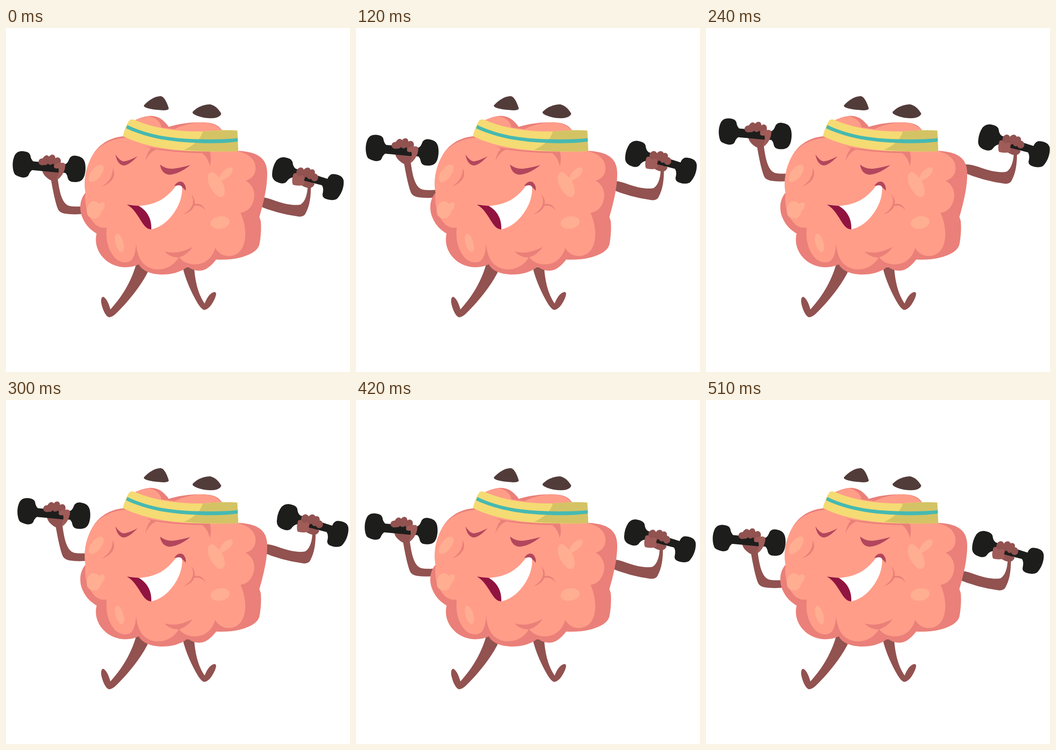
These frames come from a looping animation (748 px wide and 748 px high, 0.54 s). An HTML page:

```html
<!DOCTYPE html>
<html lang="en">
<head>
<meta charset="utf-8">
<title>Brain workout</title>
<style>
  html, body { margin: 0; width: 100%; height: 100%; overflow: hidden; background: #fff; }
  svg { display: block; width: 100vw; height: 100vh; }
  .limb { fill: #915250; }
  .finger { fill: #915250; }
  .palm { fill: #a05c58; }
  .iron { fill: #1d1e1c; }
  .shade { fill: #ea8079; }
  .skin { fill: #ff9d89; }
  .shine { fill: #ffae91; }
  .line { fill: #b3465c; }
  .brow { fill: #523c3a; }
</style>
</head>
<body>
<svg viewBox="0 0 748 748">
  <g id="arms">
    <!-- left arm -->
    <path class="limb" d="M97 325C102 354 107 379 113 394Q116 401 127 403.500Q150 407 180 403V386Q152 390 138 387C121 382 116 355 112 324Z"/>
    <path class="limb" d="M78 306C79 317 86 325 97 331Q106 335 114 328Q122 322 127 308Z"/>
    <path class="iron" d="M38 268C26 267 20 272 17 282C13 293 14 309 19 318Q23 322 35 325Q46 326 49 320Q52 312 57 309L110 314L129 315Q133 319 134 325C136 335 144 335 153 335C165 334 170 327 172 315Q174 305 172 294C169 281 160 279 150 277.500Q140 277 137 286Q134 294 129 296L59 290Q54 285 53 277Q51 269 38 268Z"/>
    <g class="finger">
      <ellipse cx="79" cy="291" rx="8.500" ry="7.500"/>
      <ellipse cx="87" cy="287.500" rx="8" ry="11" transform="rotate(22 87 287)"/>
      <ellipse cx="99" cy="286.500" rx="8" ry="11.500" transform="rotate(22 99 286)"/>
      <ellipse cx="111" cy="291" rx="8" ry="10" transform="rotate(22 111 291)"/>
    </g>
    <path class="palm" d="M104 301Q106 293 121 293Q129 292 129 299Q128 315 116 326Q108 332 111 325Q116 317 114 305Q105 307 104 301Z"/>
    <!-- right arm -->
    <path class="limb" d="M656 344C655 367 648 380 640 384Q618 388 578 373Q562 367 545 368V385Q590 404 636 410Q647 411 651 404C661 386 663 365 663 344Z"/>
    <path class="limb" d="M640 340Q650 348 661 348Q669 346 671 339L650 325Z"/>
    <path class="iron" d="M605 281Q620 283 623 291Q624 302 630 306L699 328Q703 318 711 317.500C724 318 732 323 734 331C736 345 729 363 719 372Q708 377 694 371Q686 367 689 358Q691 348 687 342L622 325Q615 327 611 333Q606 340 595 337C582 333 577 326 579 314C580 302 585 292 589 287Q596 280 605 281Z"/>
    <path class="palm" d="M625 317Q630 313 645 319Q652 323 649 328L648 332Q652 338 645 342Q634 344 624 341Q620 333 625 317Z"/>
    <g class="finger">
      <ellipse cx="640" cy="312.500" rx="8" ry="9.500" transform="rotate(30 640 312)"/>
      <ellipse cx="654" cy="314" rx="8.500" ry="11" transform="rotate(28 654 314)"/>
      <ellipse cx="663" cy="318" rx="8" ry="11.500" transform="rotate(28 663 318)"/>
      <ellipse cx="671" cy="325" rx="8" ry="8.500"/>
    </g>
  </g>

  <!-- legs -->
  <path class="limb" d="M284 510C276 540 260 576 227 612Q221 590 212 584.500Q206 584 207 597C210 613 217 627 224 629Q230 629 238 622C267 594 296 558 311 525Z"/>
  <path class="limb" d="M384 520C391 549 404 577 417 599Q425 612 431 613C441 612 449 600 455 586Q459 575 454 574C444 575 437 586 432 599C417 578 411 548 409 520Z"/>

  <!-- brain -->
  <path class="shade" d="M258 235C230 237 208 249 193 269C177 292 167 327 173 358C161 371 158 393 166 412C173 429 184 439 197 447C192 468 199 489 216 504C235 521 264 525 289 514C295 527 314 536 340 536C359 536 378 532 395 519C408 529 424 530 435 524Q447 517 457 503.500C487 505 518 500 537 488Q548 481 551 471Q556 445 554 420L551 411C560 380 568 347 568 318C569 280 543 269 503 267L470 223C461 208 444 205 425 205C399 205 376 208 354 215C343 199 329 190 313 191Q292 193 277 203Z"/>
  <path class="skin" d="M263 238C230 241 208 252 193 270C176 293 167 327 173 358C170 384 176 409 194 427Q205 436 219 434C216 462 223 486 239 502Q253 513 268 508Q281 502 283 469C285 497 295 515 314 522C340 531 365 518 376 498C388 514 411 518 430 510Q449 500 455 478C465 497 487 500 502 491C526 476 524 432 510 402C529 399 539 383 540 364Q539 342 521 332C543 326 546 306 540 292Q531 272 498 267L468 222C456 208 441 205 421 205Q390 208 366 220L338 216Q335 199 313 192Q293 193 277 204Z"/>
  <g class="shade">
    <path d="M304 258Q370 270 443 268Q448 284 443 301Q441 284 427 272Q370 271 326 264Q310 272 303 290Q306 272 315 262Z"/>
    <path d="M232 305C241 321 230 338 208 345C223 336 233 323 232 305Z"/>
    <path d="M402 360Q413 373 410 383Q426 379 434 397Q423 383 409 387Q404 400 386 405Q402 396 406 383Q409 372 402 360Z"/>
    <path d="M345 486Q373 494 406 476Q395 493 376 499Q357 499 345 486Z"/>
  </g>
  <g class="shine">
    <ellipse cx="196" cy="316" rx="11" ry="22.500" transform="rotate(38 196 316)"/>
    <path d="M178 386Q184 375 194 377Q200 379 202 383Q210 376 214 381Q217 390 207 399Q206 409 196 414Q184 415 178 408Q173 397 178 386Z"/>
    <ellipse cx="246.500" cy="467.500" rx="8.500" ry="20.500" transform="rotate(-16 246 467)"/>
    <path d="M441 317Q447 309 456 318L464 326Q468 311 483 304Q493 301 493 308Q493 321 469 332Q478 350 475 361Q471 371 461 366C448 357 433 333 441 317Z"/>
    <ellipse cx="465.500" cy="423" rx="21" ry="13.500" transform="rotate(-9 465 423)"/>
  </g>

  <!-- headband -->
  <path fill="#f5db73" d="M268 201Q272 197 280 200C324 219 377 226 428 225Q470 221 503 223L505 268C418 270 325 270 254 235Q260 213 268 201Z"/>
  <path fill="#d4c365" d="M428 225Q470 221 503 223L505 268Q440 270 387 265Q421 250 428 225Z"/>
  <path fill="#46b9b2" d="M264 211C316 236 370 241 427 242Q472 243 504 239.500V247Q465 252 421 250C362 248 311 241 261 218Z"/>

  <!-- face -->
  <path class="brow" d="M300 168C311 156 323 149 336 148Q346 149 354 175Q353 179 342 179C325 178 310 176 302 172Q299 170 300 168Z"/>
  <path class="brow" d="M406 182C417 171 431 166 444 166Q458 169 468 186Q466 194 451 196C433 197 418 193 408 187Q405 185 406 182Z"/>
  <path class="line" d="M238 275Q247 289 256 290Q267 289 286 279Q268 298 256 299Q242 297 238 275Z"/>
  <path class="line" d="M335 297Q347 307 363 306Q380 304 401 298Q376 318 355 319Q338 317 335 297Z"/>
  <path class="line" d="M366 343Q374 331 384 335Q392 341 391 354Q383 342 366 343Z"/>
  <path fill="#911440" d="M263 384Q276 386 291 387C309 398 318 416 316 438Q306 438 298 426C286 408 279 393 263 384Z"/>
  <path fill="#fff" d="M289 387C329 384 350 369 370 343Q380 340 383 346C384 368 375 391 359 410Q341 432 316 438C317 416 308 398 289 387Z"/>
</svg>
<script>
  const arms = document.getElementById('arms');
  const stepMs = 30, steps = 18, peak = 8;

  function draw(now) {
    const k = Math.floor(now / stepMs) % steps;
    const rising = k <= peak;
    const x = rising ? 1.65 * k : 13.2 - 1.46 * (k - peak);
    const y = rising ? -8.93 * k : -71.4 + 8.35 * (k - peak);
    arms.setAttribute('transform', `translate(${x} ${y})`);
    requestAnimationFrame(draw);
  }
  draw(performance.now());
</script>
</body>
</html>
```
